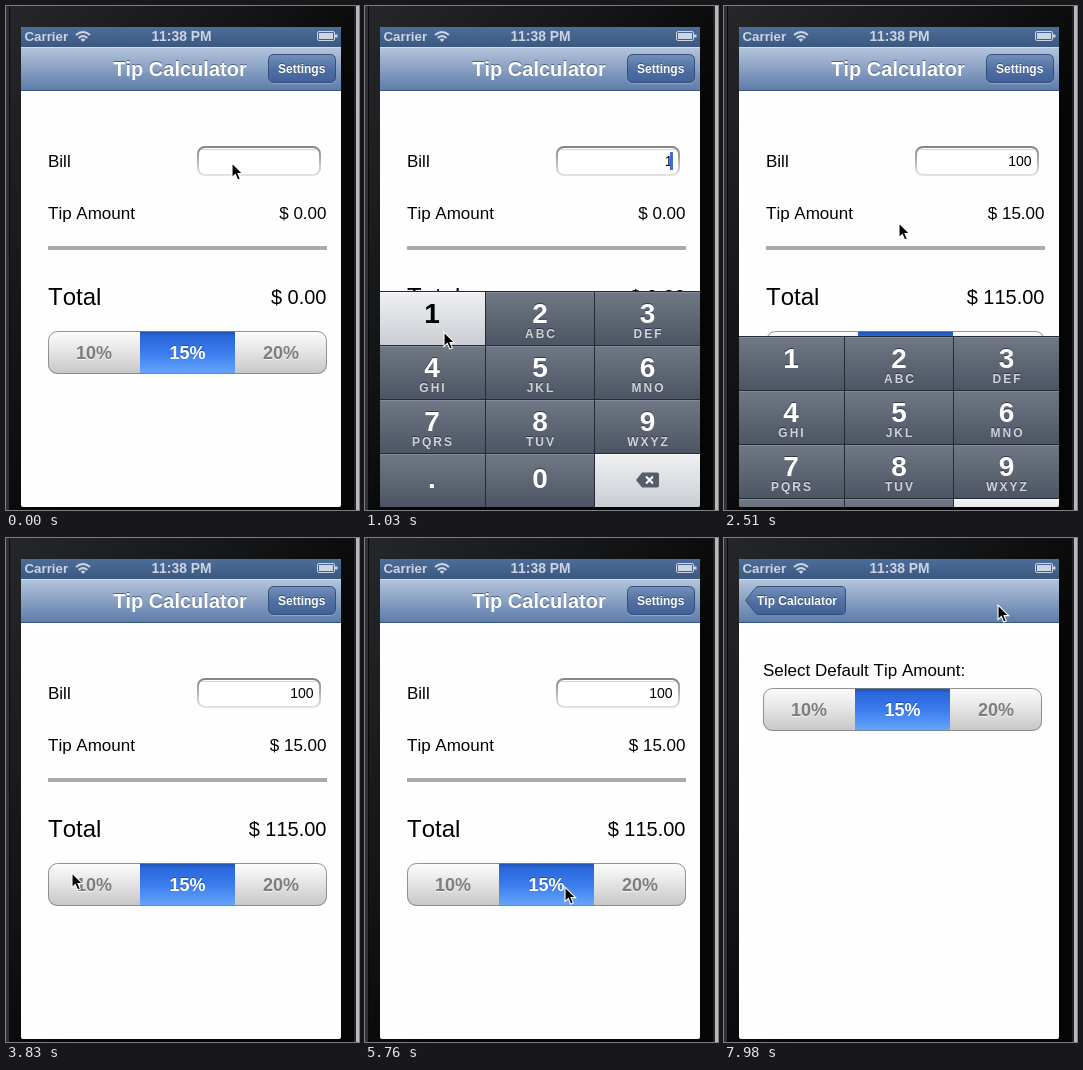
An HTML page that plays this animation: 353x504 px, repeating every 8000 ms.

```html
<!DOCTYPE html>
<html lang="en">
<head>
<meta charset="utf-8">
<title>Tip calculator demo</title>
<style>
html, body { margin: 0; width: 100%; height: 100%; overflow: hidden; background: #000; }
svg { display: block; width: 353px; height: 504px; }
text { font-family: "Liberation Sans", Arial, sans-serif; font-kerning: none; white-space: pre; }
.b { font-weight: bold; }
.mid { text-anchor: middle; }
.end { text-anchor: end; }
.nav { fill: #fff; font-weight: bold; text-shadow: 0 -1px 0 rgba(25, 40, 70, .55); }
.status { fill: #cbd5e3; font-weight: bold; }
.body { font-size: 17px; }
.seg text { font-size: 18px; font-weight: bold; text-anchor: middle; fill: #7d7d7d; text-shadow: 0 1px 0 rgba(255, 255, 255, .7); }
.seg .on text { fill: #fff; text-shadow: 0 -1px 0 rgba(0, 30, 100, .45); }
.seg .fill { visibility: hidden; }
.seg .on .fill { visibility: visible; }
.key .face { fill: url(#keyDark); }
.key .lit { fill: #848c99; }
.key text { fill: #fff; font-weight: bold; text-anchor: middle; text-shadow: 0 -1px 0 rgba(20, 25, 35, .6); }
.key .num { font-size: 28px; }
.key .abc { font-size: 12px; letter-spacing: 2px; fill: #d0d4da; }
.key.down .face, .key.light .face { fill: url(#keyLight); }
.key.down .lit, .key.light .lit { fill: #f8f9fa; }
.key.down text { fill: #000; text-shadow: none; }
</style>
</head>
<body>
<svg viewBox="0 0 353 504" xmlns="http://www.w3.org/2000/svg">
  <defs>
    <linearGradient id="bezel" x2="1" y2="1">
      <stop stop-color="#25272a"/><stop offset=".35" stop-color="#141516"/><stop offset=".6" stop-color="#050505"/>
    </linearGradient>
    <linearGradient id="status" x2="0" y2="1"><stop stop-color="#4d6c98"/><stop offset="1" stop-color="#3a587f"/></linearGradient>
    <linearGradient id="bar" x2="0" y2="1"><stop stop-color="#b5c5dc"/><stop offset="1" stop-color="#5b7ba8"/></linearGradient>
    <linearGradient id="btn" x2="0" y2="1"><stop stop-color="#7590b9"/><stop offset=".5" stop-color="#5272a4"/><stop offset="1" stop-color="#40609a"/></linearGradient>
    <linearGradient id="btnDown" x2="0" y2="1"><stop stop-color="#3d5480"/><stop offset="1" stop-color="#223c70"/></linearGradient>
    <linearGradient id="rim" x2="0" y2="1"><stop stop-color="#858585"/><stop offset=".5" stop-color="#b4b4b4"/><stop offset="1" stop-color="#e2e2e2"/></linearGradient>
    <linearGradient id="plain" x2="0" y2="1"><stop stop-color="#fdfdfd"/><stop offset=".45" stop-color="#e6e6e6"/><stop offset="1" stop-color="#c6c6c6"/></linearGradient>
    <linearGradient id="blue" x2="0" y2="1"><stop stop-color="#1c4fae"/><stop offset=".12" stop-color="#2a67da"/><stop offset=".5" stop-color="#3a7bee"/><stop offset="1" stop-color="#68a6fc"/></linearGradient>
    <linearGradient id="keyDark" x2="0" y2="1"><stop stop-color="#707885"/><stop offset="1" stop-color="#4d5564"/></linearGradient>
    <linearGradient id="keyLight" x2="0" y2="1"><stop stop-color="#eff1f3"/><stop offset="1" stop-color="#c9cdd3"/></linearGradient>
    <clipPath id="screen"><rect x="15" y="21" width="320" height="480" rx="2"/></clipPath>
    <clipPath id="segClip"><rect x="42" y="325" width="279" height="43" rx="9"/></clipPath>
  </defs>

  <rect width="353" height="504" fill="url(#bezel)"/>
  <rect width="3" height="504" fill="#303236"/>
  <rect x="3" width="1" height="504" fill="#08090a"/>
  <rect x="348" width="2" height="504" fill="#222325"/>
  <rect x="350" width="3" height="504" fill="#b9babb"/>

  <g clip-path="url(#screen)">
    <rect x="15" y="21" width="320" height="480" fill="#fefefe"/>

    <g id="home">
      <text class="body" x="42" y="161">Bill</text>
      <rect x="192" y="141" width="122" height="28" rx="7" fill="#fff" stroke="url(#rim)" stroke-width="2"/>
      <path d="M196 143.5H310" stroke="#d4d4d4"/>
      <text id="bill" class="end" x="307.5" y="160" font-size="14"></text>
      <rect id="caret" x="305" y="146" width="3" height="18" fill="#4169dc"/>
      <text class="body" x="42" y="213">Tip Amount</text>
      <text id="tip" class="body end" x="320.5" y="213"></text>
      <rect x="42" y="240" width="279" height="4" fill="#aaa"/>
      <text x="42" y="299" font-size="24">Total</text>
      <text id="total" class="end" x="320.5" y="298" font-size="20"></text>
      <g id="rates" class="seg"></g>
    </g>

    <g id="prefs">
      <text class="body" x="39" y="138">Select Default Tip Amount:</text>
      <g id="defaults" class="seg" transform="translate(-3 -175)"></g>
    </g>

    <g id="pad"></g>

    <rect x="15" y="21" width="320" height="20" fill="url(#status)"/>
    <text class="status" x="18.5" y="35" font-size="13.3">Carrier</text>
    <text class="status mid" x="175.5" y="35" font-size="13.9">11:38 PM</text>
    <g fill="none" stroke="#cbd5e3" stroke-width="2">
      <path d="M70 29Q77 23 84 29M72.7 32Q77 28 81.3 32"/>
      <path d="M74.6 33.4Q77 31.6 79.4 33.4L77 36Z" fill="#cbd5e3" stroke="none"/>
      <rect x="311.5" y="25.5" width="17" height="9" rx="1.5" stroke-width="1"/>
      <path d="M313 27h14v6h-14zM329 28.5h2.5v3h-2.5z" fill="#cbd5e3" stroke="none"/>
    </g>

    <rect x="15" y="41" width="320" height="44" fill="url(#bar)"/>
    <rect x="15" y="41" width="320" height="1" fill="#d2dce9"/>
    <rect x="15" y="84" width="320" height="1" fill="#3b577f"/>
    <text id="title" class="nav mid" x="174" y="70" font-size="20">Tip Calculator</text>
    <g id="settings">
      <rect x="262.5" y="49.5" width="67" height="28" rx="5" fill="none" stroke="#a9bbd5" stroke-opacity=".6"/>
      <rect id="settingsFace" x="262.5" y="48.5" width="67" height="28" rx="5" fill="url(#btn)" stroke="#354f7b"/>
      <text class="nav mid" x="295.7" y="67" font-size="12">Settings</text>
    </g>
    <g id="back">
      <path d="M21.5 62.5L31 50.5Q32.5 48.5 35 48.5H117Q121.5 48.5 121.5 53V72Q121.5 76.5 117 76.5H35Q32.5 76.5 31 74.5Z" fill="url(#btn)" stroke="#354f7b"/>
      <text class="nav" x="33" y="67" font-size="12">Tip Calculator</text>
    </g>
  </g>

  <path id="cursor" d="M0 0V14.6L3.3 11.5L5.7 17L8.3 15.9L6 10.6H10.6Z" fill="#000" stroke="#fff" stroke-width="1.1"/>
</svg>

<script>
const $ = id => document.getElementById(id);
const LOOP = 8000, TICK = 147.7;
const RATES = [10, 15, 20];
const EDGES = [42, 134, 229, 321];

function segments(el) {
  const parts = RATES.map((rate, i) => {
    const x = EDGES[i], w = EDGES[i + 1] - x;
    return `<g><rect class="fill" x="${x}" y="325" width="${w}" height="43" fill="url(#blue)" clip-path="url(#segClip)"/>
      <text x="${88 + i * 93.5}" y="353">${rate}%</text></g>`;
  });
  el.innerHTML = `<rect x="42" y="325" width="279" height="43" rx="9" fill="url(#plain)"/>
    <path d="M134.5 325v43M228.5 325v43" stroke="#a2a2a2"/>${parts.join('')}
    <rect x="42.5" y="325.5" width="278" height="42" rx="9" fill="none" stroke="#808080" stroke-opacity=".85"/>`;
}

function keypad() {
  const labels = ['1', '2ABC', '3DEF', '4GHI', '5JKL', '6MNO', '7PQRS', '8TUV', '9WXYZ', '.', '0', '<'];
  const cols = [15, 121, 230, 336];
  const keys = labels.map((label, i) => {
    const c = i % 3, r = (i - c) / 3;
    const x = cols[c], w = cols[c + 1] - x - 1, y = 286 + r * 54;
    const cx = [67, 175, 282.5][c], base = y + (r < 3 ? 30.5 : 34);
    const icon = `<path d="M${cx - 11.5} ${y + 26}l6 -7.5h15q2 0 2 2v11q0 2 -2 2h-15z" fill="#555d6b"/>
      <path d="M${cx - 1.5} ${y + 22.5}l7 7m0 -7l-7 7" stroke="#fff" stroke-width="2"/>`;
    const face = label === '<' ? icon
      : `<text class="num" x="${cx}" y="${base}">${label[0]}</text><text class="abc" x="${cx + 1}" y="${y + 46}">${label.slice(1)}</text>`;
    return `<g class="key ${label === '<' ? 'light' : ''}" id="key${i}">
      <rect class="face" x="${x}" y="${y}" width="${w}" height="53"/>
      <rect class="lit" x="${x}" y="${y}" width="${w}" height="1"/>${face}</g>`;
  });
  $('pad').innerHTML = `<rect x="15" y="285" width="320" height="217" fill="#252b36"/>${keys.join('')}`;
}

// Pointer trips: last resting tick, arrival tick, target
const TRIPS = [
  [2, 6, 79, 326], [7, 9, 172, 468], [12, 15, 175, 217], [19, 26, 66, 335],
  [28, 32, 280, 345], [35, 38, 200, 349], [41, 49, 274, 67]
];
const smooth = p => p * p * (3 - 2 * p);

function pointer(k) {
  let x = 226, y = 157;
  for (const [from, to, tx, ty] of TRIPS) {
    const p = smooth(Math.min(1, Math.max(0, (k - from) / (to - from))));
    x += (tx - x) * p;
    y += (ty - y) * p;
  }
  return [x, y];
}

// Value of the last [tick, value] step reached
const step = (k, steps) => steps.reduce((v, [at, next]) => k >= at ? next : v, null);
const move = (el, x, y) => el.setAttribute('transform', `translate(${x.toFixed(2)} ${y.toFixed(2)})`);
const money = n => '$ ' + n.toFixed(2);

function select(el, index) {
  el.querySelectorAll('g').forEach((g, i) => g.classList.toggle('on', i === index));
}

function draw(k) {
  const bill = step(k, [[0, ''], [7, '1'], [10, '10'], [12, '100']]);
  const choice = step(k, [[0, 1], [27, 0], [33, 2], [39, 1]]);
  const amount = k < 17 ? 0 : 100;
  const tip = amount * RATES[choice] / 100;
  const push = step(k, [[0, 0], [53, .5], [54, 1]]);

  $('bill').textContent = bill;
  $('tip').textContent = money(tip);
  $('total').textContent = money(amount + tip);
  $('caret').style.opacity = k >= 1 && k < 17 ? 1 : 0;
  select($('rates'), choice);

  move($('pad'), 0, step(k, [[0, 217], [1, 160], [2, 20], [3, 0], [17, 45], [18, 217]]));
  $('key0').classList.toggle('down', k === 7);
  $('key10').classList.toggle('down', k === 10 || k === 12);

  move($('home'), -320 * push, 0);
  move($('prefs'), 320 * (1 - push), 0);
  move($('title'), -101 * push, 0);
  move($('back'), 101 * (1 - push), 0);
  $('title').style.opacity = $('settings').style.opacity = 1 - push;
  $('back').style.opacity = push;
  $('settingsFace').setAttribute('fill', `url(#${k === 51 ? 'btnDown' : 'btn'})`);

  move($('cursor'), ...pointer(k));
}

let shown = -1;
function frame() {
  const k = Math.floor((performance.now() % LOOP + 12) / TICK);
  if (k !== shown) draw(shown = k);
  requestAnimationFrame(frame);
}

segments($('rates'));
segments($('defaults'));
select($('defaults'), 1);
keypad();
frame();
</script>
</body>
</html>
```
